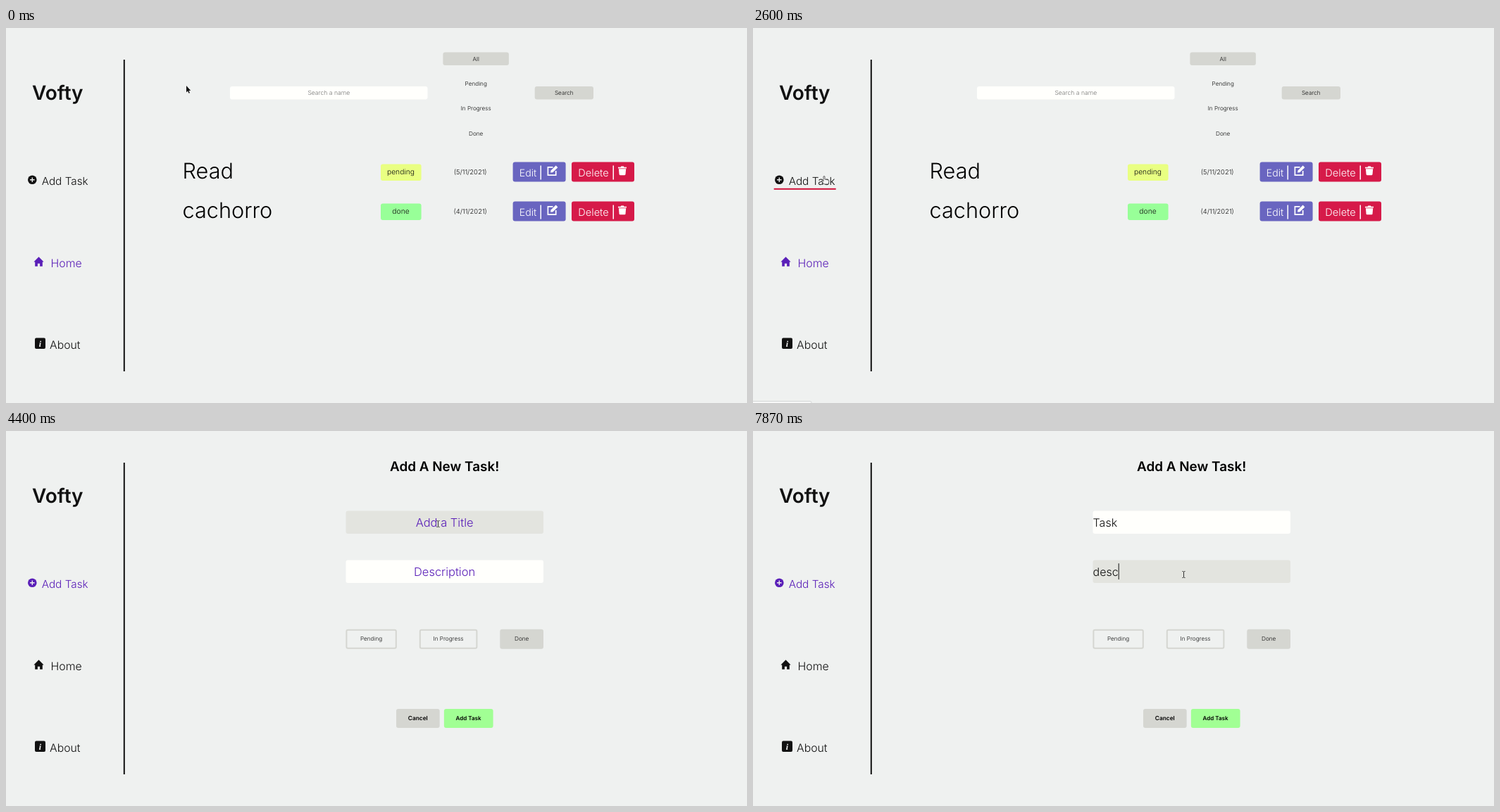
Animation, 1052 px wide and 533 px high, one loop 8 s. Source, as an HTML page:

```html
<!DOCTYPE html>
<html lang="en">
<head>
<meta charset="utf-8">
<title>Task list</title>
<style>
html, body { margin: 0; width: 100%; height: 100%; overflow: hidden; background: #eff1f0; }
svg { display: block; width: 1052px; height: 533px; }
text { font-family: Inter, "Open Sans", sans-serif; font-optical-sizing: none; text-rendering: geometricPrecision; }
</style>
</head>
<body>
<svg id="stage" viewBox="0 0 1052 533"></svg>
<script>
const LOOP = 8000, PAGE_SWITCH = 2870;
const BG = '#eff1f0', INK = '#111', PURPLE = '#5a1fb8', RED = '#d1123a',
      GREY = '#d5d6d1', FIELD = '#fffffc', FOCUS = '#e3e4df';
const stage = document.getElementById('stage');
const ruler = document.createElement('canvas').getContext('2d');

// Pointer path: time, x, y
const PATH = [
  [0, 256, 82], [70, 256, 82], [270, 353, 128], [450, 215, 222], [600, 113, 234],
  [870, 102, 215], [930, 101, 211], [1800, 101, 211], [1930, 95, 300], [2070, 91, 329],
  [2190, 91, 327], [2400, 99, 229], [2600, 101, 211], [2930, 101, 211], [3330, 354, 206],
  [3470, 460, 192], [3730, 613.5, 135], [3930, 613.5, 132], [6330, 613.5, 132],
  [6530, 636, 170], [6730, 612, 202], [7000, 611.5, 204], [LOOP, 611.5, 204]
];

const clamp = v => Math.min(1, Math.max(0, v));
const smooth = v => { v = clamp(v); return v * v * (3 - 2 * v); };

const box = (x, y, w, h, fill, r = 3, extra = '') =>
  `<rect x="${x}" y="${y}" width="${w}" height="${h}" rx="${r}" fill="${fill}" ${extra}/>`;
const shape = (d, fill, extra = '') => `<path d="${d}" fill="${fill}" ${extra}/>`;
const label = (s, x, y, size, { fill = INK, weight = 300, anchor = 'start' } = {}) =>
  `<text x="${x}" y="${y}" font-size="${size}" font-weight="${weight}" fill="${fill}" text-anchor="${anchor}">${s}</text>`;
const centred = (s, x, y, size, fill = INK, weight = 350) =>
  label(s, x, y, size, { fill, weight, anchor: 'middle' });

function pointerAt(t) {
  const i = Math.max(1, PATH.findIndex(p => p[0] >= t));
  const [t0, x0, y0] = PATH[i - 1], [t1, x1, y1] = PATH[i];
  const k = clamp((t - t0) / (t1 - t0));
  return [x0 + (x1 - x0) * k, y0 + (y1 - y0) * k];
}

function pointer(t) {
  const [x, y] = pointerAt(t);
  const onLink = x > 30 && x < 118 && (y > 203 && y < 236 || y > 316 && y < 347);
  const onField = t > PAGE_SWITCH && x > 482 && x < 763 && (y > 113 && y < 146 || y > 183 && y < 216);
  let art;
  if (onLink) {
    art = shape('M-1 0Q0-1 1 0V4L5.5 5Q7 5.4 6.8 7L6 11H0L-3.3 6.8Q-3.6 5.4-2.3 5.6L-1 7Z',
      '#f4f4f4', 'stroke="#444" stroke-width=".8"');
  } else if (onField) {
    art = shape('M-2-4.5Q0-4.5 0-3.5Q0-4.5 2-4.5M0-3.5V3.5M-2 4.5Q0 4.5 0 3.5Q0 4.5 2 4.5',
      'none', 'stroke="#333" stroke-width="1"');
  } else {
    art = shape('M0 0V9.4L2.1 7.5 3.5 10.8 5 10.2 3.6 7H6.3Z',
      INK, 'stroke="#fff" stroke-width=".7" paint-order="stroke"');
  }
  return `<g transform="translate(${x} ${y})">${art}</g>`;
}

// Link underline that opens from its middle and closes again
function underline(t, y, from, to, color) {
  const w = 88 * Math.min(smooth((t - from) / 350), 1 - smooth((t - to) / 250));
  return w > 0 ? box(73.7 - w / 2, y, w, 2, color, 0) : '';
}

function sidebar(t) {
  const adding = t >= PAGE_SWITCH;
  const add = adding ? PURPLE : INK, home = adding ? INK : PURPLE;
  let lines = underline(t, 344.2, 1860, 2220, PURPLE);
  if (adding) lines += underline(t, 227.8, 2762, 3000, RED);
  else lines += underline(t, 227.8, t < 2100 ? 590 : 2230, t < 2100 ? 1800 : LOOP, RED);
  return box(166.8, 45, 2, 443, INK, 0) +
    label('Vofty', 37, 102, 28, { weight: 600 }) +
    `<circle cx="37.3" cy="215.7" r="6.3" fill="${add}"/>` +
    shape('M34 215.7h6.6M37.3 212.4v6.6', 'none', `stroke="${BG}" stroke-width="1.4"`) +
    label('Add Task', 50.7, 223.3, 15.3, { fill: add }) +
    shape('M46.5 325.3 53.6 332.6H51.8V338.8H48.1V334.8H44.9V338.8H41.2V332.6H39.4Z', home) +
    label('Home', 63.5, 339.8, 15.9, { fill: home }) +
    box(41, 440.5, 15, 15.5, INK, 2) +
    `<text x="48.4" y="452.8" font-size="12" font-weight="700" font-style="italic" fill="#fff" text-anchor="middle" style="font-family:'Liberation Serif',serif">i</text>` +
    label('About', 62, 456, 15.8) + lines;
}

function task(name, status, color, date, y) {
  const white = { fill: '#fff' };
  return `<g transform="translate(0 ${y})">` +
    label(name, 250.5, 23.7, 30.7, { fill: '#000' }) +
    box(532, 3, 57.6, 23.4, color) + centred(status, 560.5, 17.9, 10.3) +
    centred(date, 659.2, 17.8, 9.4) +
    box(719.6, 0, 75, 28, '#6965c0') + label('Edit', 728.7, 20.2, 14.2, white) +
    box(758.5, 5, 1.5, 20, '#fff', 0) +
    shape('M776.5 7.3H769.4V18.6H780.7V12.5', 'none', 'stroke="#fff" stroke-width="1.7"') +
    shape('M773 14.9 773.6 12 780.6 5 783.4 7.8 776.2 14.8Z', '#fff') +
    box(803, 0, 89, 28, '#d61a49') + label('Delete', 812.3, 20.2, 14.6, white) +
    box(861.5, 5, 1.5, 20, '#fff', 0) +
    shape('M869 7.2H872.6L873.3 6H876.8L877.5 7.2H881V8.9H869ZM869.9 9.7H880.2L879.5 17.6Q879.4 18.7 878.3 18.7H871.8Q870.7 18.7 870.6 17.6Z', '#fff') +
    '</g>';
}

function listPage() {
  return box(318, 83, 280.5, 18.6, FIELD) + centred('Search a name', 458.3, 95, 8.6, '#777') +
    box(620.4, 34.5, 93.5, 18.6, GREY) +
    ['All', 'Pending', 'In Progress', 'Done'].map((s, i) => centred(s, 667.2, 46.5 + i * 35.4, 8.2)).join('') +
    box(750.7, 83, 83.3, 18.6, GREY) + centred('Search', 792.3, 95, 8.2) +
    task('Read', 'pending', '#e9ff82', '(5/11/2021)', 190.5) +
    task('cachorro', 'done', '#98ff98', '(4/11/2021)', 246.6);
}

function field(y, hint, value, focused, caret) {
  ruler.font = '300 16px Inter, "Open Sans", sans-serif';
  const end = 482.6 + ruler.measureText(value).width;
  return box(482.5, y, 280.5, 32.6, focused ? FOCUS : FIELD) +
    (value ? label(value, 482.6, y + 22, 16) : centred(hint, 622.6, y + 22, 16.5, PURPLE, 300)) +
    (focused && caret ? box(end, y + 4.7, 1, 22.8, INK, 0) : '');
}

const typed = (word, times, t) => word.slice(0, times.filter(k => t >= k).length);

function formPage(t) {
  const first = t >= 3930 && t < 7000, second = t >= 7000;
  const title = typed('Task', [4870, 5270, 5400, 6130], t);
  const about = typed('desc', [7330, 7470, 7730, 7870], t);
  const caret = !(t >= 4400 && t < 4870 || t >= 6000 && t < 6130);
  const outlined = (s, x, w) =>
    box(x + 1, 282.8, w - 2, 26, BG, 2, `stroke="${GREY}" stroke-width="2"`) +
    centred(s, x + w / 2, 298.2, 8.2);
  return centred('Add A New Task!', 622.6, 57, 18.9, '#000', 600) +
    field(113.5, 'Add a Title', title, first, caret) +
    (first && t >= 6530 ? box(482.6, 136.4, 34.6, 1, '#e0555f', 0) : '') +
    field(183.5, 'Description', about, second, caret) +
    outlined('Pending', 482.4, 72.4) + outlined('In Progress', 586.8, 82.6) +
    box(701.3, 281.8, 61.7, 28, GREY) + centred('Done', 732.2, 298.2, 8.2) +
    box(554, 395, 61.7, 27, GREY) + centred('Cancel', 584.8, 411, 8.3, '#000', 600) +
    box(621.9, 395, 69.7, 27, '#a1ff94') + centred('Add Task', 656.5, 411, 8, '#000', 600);
}

function linkHint(t) {
  if (t < 2000 || t >= 3400) return '';
  return box(-4, 530.5, t < 2350 ? 85 : 87, 8, '#f7f8f8', 2, 'stroke="#d3d5d5" stroke-width="1"');
}

function draw(now) {
  const t = now % LOOP;
  stage.innerHTML = sidebar(t) + (t < PAGE_SWITCH ? listPage() : formPage(t)) + linkHint(t) + pointer(t);
  requestAnimationFrame(draw);
}

draw(0);
</script>
</body>
</html>
```
